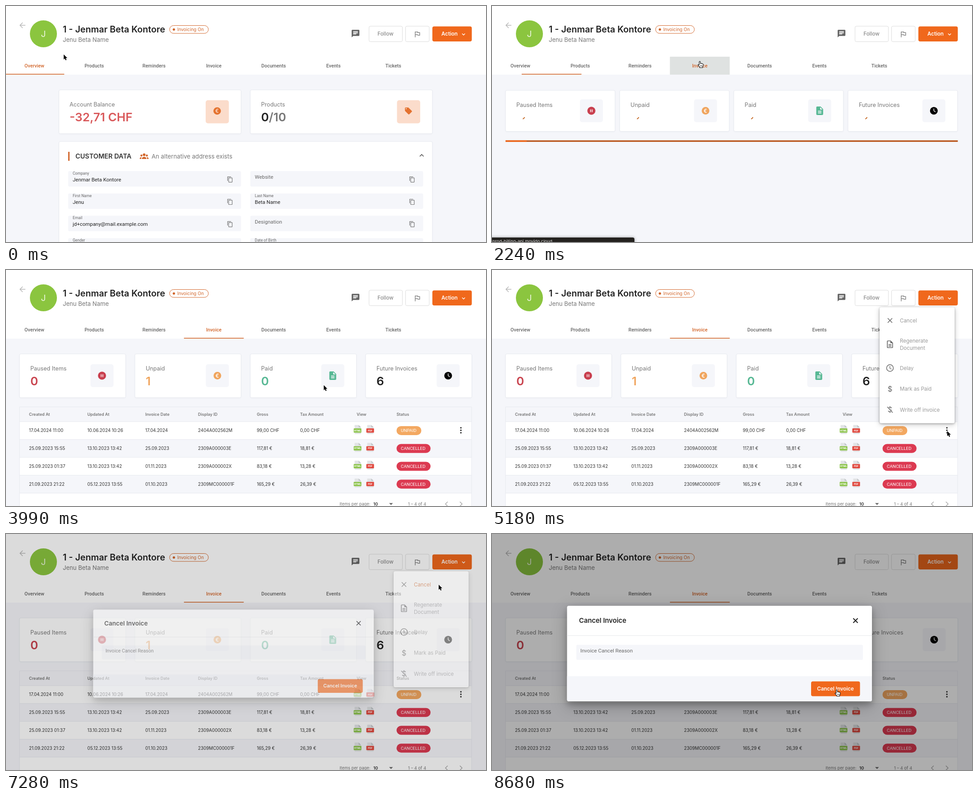
Recreate the animation shown at these times as an HTML page. Size 1065 px wide and 526 px high, loop 9.1 s.

```html
<!DOCTYPE html>
<html lang="en">
<head>
<meta charset="utf-8">
<title>Cancel an invoice</title>
<style>
html, body { margin: 0; width: 100%; height: 100%; overflow: hidden; background: #fff; }
svg { display: block; width: 1065px; height: 526px; font-family: Inter, Roboto, sans-serif; }
.rb { font-family: Roboto, sans-serif; }
.card { filter: drop-shadow(0 1px 1px rgba(30, 40, 80, .04)); }
.menu { filter: drop-shadow(0 1px 2px rgba(0, 0, 0, .3)) drop-shadow(0 3px 6px rgba(0, 0, 0, .2)); }
.dialog { filter: drop-shadow(0 7px 7px rgba(0, 0, 0, .22)) drop-shadow(0 9px 17px rgba(0, 0, 0, .24)); }
.bubble { filter: drop-shadow(0 0 3px rgba(0, 0, 0, .4)); }
</style>
</head>
<body>
<svg id="stage" viewBox="0 0 1065 526"></svg>
<script>
const LOOP = 9100, STEP = 70;
const ORANGE = '#f0681c', RUST = '#d2662b', GREY = '#777', PALE = '#f5f6fa', LINE = '#e7e9ef', INK = '#222';
const ICON = {
  chat: 'M20 2H4c-1.1 0-2 .9-2 2v18l4-4h14c1.1 0 2-.9 2-2V4c0-1.1-.9-2-2-2zM6 9h12v2H6zm8 5H6v-2h8zm4-6H6V6h12z',
  flag: 'M14.4 6 14 4H5v17h2v-7h5.6l.4 2h7V6zm3.6 8h-4l-.4-2H7V6h5l.4 2H18z',
  copy: 'M16 1H4c-1.1 0-2 .9-2 2v14h2V3h12zm3 4H8c-1.1 0-2 .9-2 2v14c0 1.1.9 2 2 2h11c1.1 0 2-.9 2-2V7c0-1.1-.9-2-2-2zm0 16H8V7h11z',
  doc: 'M14 2H6c-1.1 0-2 .9-2 2v16c0 1.1.9 2 2 2h12c1.1 0 2-.9 2-2V8zm2 16H8v-2h8zm0-4H8v-2h8zm-3-5V3.5L18.5 9z',
  docLine: 'M8 16h8v2H8zm0-4h8v2H8zm6-10H6c-1.1 0-2 .9-2 2v16c0 1.1.9 2 2 2h12c1.1 0 2-.9 2-2V8zm4 18H6V4h7v5h5z',
  tag: 'M21.4 11.6l-9-9C12 2.2 11.5 2 11 2H4c-1.1 0-2 .9-2 2v7c0 .5.2 1 .6 1.4l9 9c.8.8 2 .8 2.8 0l7-7c.8-.8.8-2 0-2.8zM5.5 7a1.5 1.5 0 1 1 0-3 1.5 1.5 0 0 1 0 3z'
};

const clamp = (v, a = 0, b = 1) => Math.min(b, Math.max(a, v));
const smooth = p => p * p * (3 - 2 * p);
const span = (t, from, to) => clamp((t - from) / (to - from));

const rect = (x, y, w, h, fill, r = 0, extra = '') =>
  `<rect x="${x}" y="${y}" width="${w}" height="${h}" rx="${r}" fill="${fill}" ${extra}/>`;
const circle = (x, y, r, fill, extra = '') => `<circle cx="${x}" cy="${y}" r="${r}" fill="${fill}" ${extra}/>`;
const text = (x, y, s, size, fill, weight = 400, extra = '') =>
  `<text x="${x}" y="${y}" font-size="${size}" fill="${fill}" font-weight="${weight}" ${extra}>${s}</text>`;
const roboto = (x, y, s, size, fill, weight = 400, extra = '') => text(x, y, s, size, fill, weight, 'class="rb" ' + extra);
const stroke = (d, color, w = 1.5, extra = '') => `<path d="${d}" fill="none" stroke="${color}" stroke-width="${w}" ${extra}/>`;
const icon = (name, x, y, scale, fill) =>
  `<path d="${ICON[name]}" fill="${fill}" transform="translate(${x} ${y}) scale(${scale}) translate(-12 -12)"/>`;
const group = (body, extra = '') => `<g ${extra}>${body}</g>`;
const cross = (x, y, r, color, w) => stroke(`M${x - r} ${y - r}l${2 * r} ${2 * r}m0 ${-2 * r}l${-2 * r} ${2 * r}`, color, w);
const MID = 'text-anchor="middle"';
const panel = (x, y, w, h) => rect(x, y, w, h, '#fff', 3, `stroke="${LINE}" class="card"`);
const euro = (x, y, r, fill, ink) => circle(x, y, r, fill) + text(x - .3, y + 4.2, '€', 11.5, ink, 600, MID);

function header(t, active) {
  const tabs = ['Overview', 'Products', 'Reminders', 'Invoice', 'Documents', 'Events', 'Tickets'];
  const inkX = -3.4 + 398.2 * smooth(span(t, 2110, 2600));
  const focus = t < 2170 ? 0 : 1 - span(t, 2520, 2730);
  return rect(0, 0, 1065, 153, '#fff') +
    stroke('M43 43H31m6-6l-6 6 6 6', '#b9b9b9', 1.5) +
    circle(83, 62, 30, '#8bc53f') + text(83, 69, 'J', 19, '#eef7e2', 400, MID) +
    text(126, 59, '1 - Jenmar Beta Kontore', 19.7, INK, 600) +
    text(126, 80, 'Jenu Beta Name', 13.1, GREY) +
    rect(363, 43.5, 86, 17.5, '#fff', 8.75, `stroke="${RUST}"`) +
    circle(372.5, 52.3, 2.6, RUST) + text(380, 56, 'Invoicing On', 10, RUST) +
    icon('chat', 775.5, 61.5, .86, '#666') +
    rect(805.5, 45, 74, 34.5, '#fff', 3, 'stroke="#dcdcdc"') + text(842, 66.2, 'Follow', 11.5, '#8a8a8a', 500, MID) +
    rect(886.5, 45, 52.5, 34.5, '#fff', 3, 'stroke="#dcdcdc"') + icon('flag', 912.5, 63, .76, '#888') +
    rect(946, 45.5, 87.5, 33.5, ORANGE, 4) + text(966, 66.2, 'Action', 11.5, '#fff', 600) +
    stroke('M1012 61.5l3.2 3.2 3.2-3.2', '#fff', 1.4) +
    rect(394.7, 113, 132.7, 40, '#dfe2e1', 0, `opacity="${focus}"`) +
    tabs.map((s, i) => roboto(63 + 132.7 * i, 136.5, s, 10.67, i === active ? RUST : '#666', 500, MID)).join('') +
    rect(inkX, 151.2, 132.7, 1.6, RUST);
}

function field(x, y, label, value) {
  return rect(x, y, 383.5, 34.5, PALE, 3) + icon('copy', x + 359, y + 18.7, .6, '#777') + (value
    ? roboto(x + 10, y + 7.7, label, 8.6, '#666') + roboto(x + 10, y + 22.8, value, 11.45, INK)
    : roboto(x + 10, y + 17.2, label, 11.45, '#666'));
}

function overview() {
  const people = [[306.5, 331.5, 3], [300.5, 333.2, 2.2], [312.5, 333.2, 2.2]].map(p => circle(...p, RUST)).join('') +
    `<path d="M301.5 341v-2.2q5-5.4 10 0V341zM296.8 341v-2q1.4-2.4 4-2.3-1 2-.8 4.3zM316.2 341v-2q-1.4-2.4-4-2.3 1 2 .8 4.3z" fill="${RUST}"/>`;
  const rows = [
    ['Company', 'Jenmar Beta Kontore', 'Website', ''],
    ['First Name', 'Jenu', 'Last Name', 'Beta Name'],
    ['Email', 'jd+company@mail.example.com', 'Designation', ''],
    ['Gender', ' ', 'Date of Birth', ' ']];
  return panel(117.5, 187, 404, 97.5) + text(141, 223.5, 'Account Balance', 12.6, GREY) +
    text(141, 256.5, '-32,71 CHF', 26.2, '#d9595b', 600) +
    rect(443, 210, 51.5, 51.5, '#fbdccb', 5) + euro(468.5, 234, 8.3, '#e4722f', '#fbdccb') +
    panel(542, 187, 404, 97.5) + text(566, 223.5, 'Products', 12.6, GREY) +
    text(566, 256.5, `0<tspan fill="${GREY}">/10</tspan>`, 26.2, INK, 600) +
    rect(867.5, 210, 51.5, 51.5, '#fbdccb', 5) + icon('tag', 893, 234, .78, '#e4722f') +
    panel(117.5, 302, 828.5, 260) + rect(138, 325, 3, 20, RUST) +
    text(154, 340.3, 'CUSTOMER DATA', 14.5, '#333', 600) + people +
    text(323, 340, 'An alternative address exists', 13.2, GREY) +
    stroke('M918 335.3l4.3-4.3 4.3 4.3', '#555', 1.6) +
    rows.map((r, i) => field(138, 368 + 49.8 * i, r[0], r[1]) + field(542, 368 + 49.8 * i, r[2], r[3])).join('');
}

function spinner(x, y, t) {
  const phase = t - 2240, mid = 45 + phase * 360 / 770;
  const half = (35 + 200 * Math.sin(Math.PI * phase / 700) ** 2) / 2;
  const at = deg => `${x + 9.5 * Math.cos(deg * Math.PI / 180)} ${y + 9.5 * Math.sin(deg * Math.PI / 180)}`;
  return stroke(`M${at(mid - half)}A9.5 9.5 0 ${half > 90 ? 1 : 0} 1 ${at(mid + half)}`, '#c4651f', 2);
}

function summaryCards(t, listed, counted) {
  const pitch = listed ? 256 : 253.3, w = listed ? 235.5 : 243, top = listed ? 187 : 188;
  const cy = counted ? 235.5 : top + 45.5;
  const icons = [
    x => circle(x, cy, 9, '#c9404f') + stroke(`M${x - 1.8} ${cy - 3}v6m3.6-6v6`, '#fff', 1.6),
    x => euro(x, cy, 8.5, '#f0a55e', '#fff'),
    x => icon('doc', x, cy, .95, '#57b894'),
    x => circle(x, cy, 8.6, '#000') + stroke(`M${x} ${cy - 5}v5l3.4 2.6`, '#fff', 1.4)];
  const cards = [['Paused Items', 0, '#c9444f'], ['Unpaid', 1, '#f0a55e'], ['Paid', 0, '#57b894'], ['Future Invoices', 6, INK]];
  return cards.map(([label, count, color], i) => {
    const x = 30 + pitch * i, ix = x + w - 52.5;
    return panel(x, top, w, counted ? 97.5 : 91.5) + text(x + 24, top + 36.5, label, 12.6, GREY) +
      rect(ix - 25.5, cy - 25.5, 51, 51, PALE, 5) + icons[i](ix) +
      (counted ? text(x + 24, 256.5, count, 26.2, color, 600) : spinner(x + 34, top + 55.5, t));
  }).join('');
}

function fileIcon(x, y, label, color) {
  return `<path d="M${x + 2} ${y}h9l5 5v15h-14z" fill="#e2e4e6"/><path d="M${x + 11} ${y}l5 5h-5z" fill="#bfc4c8"/>` +
    rect(x, y + 7.5, 17, 9.5, color, 1) + text(x + 8.5, y + 14.2, label, 5.2, '#fff', 700, MID);
}

function table(dy) {
  const cols = [51, 180.5, 309, 426, 556.5, 652.5, 778, 866.5];
  const heads = ['Created At', 'Updated At', 'Invoice Date', 'Display ID', 'Gross', 'Tax Amount', 'View', 'Status'];
  const rows = [
    ['17.04.2024 11:00', '10.06.2024 10:26', '17.04.2024', '2404A002562M', '99,00 CHF', '0,00 CHF'],
    ['25.09.2023 15:55', '13.10.2023 13:42', '25.09.2023', '2309A000003E', '117,81 €', '18,81 €'],
    ['25.09.2023 01:37', '13.10.2023 13:42', '01.11.2023', '2309A000002X', '83,18 €', '13,28 €'],
    ['21.09.2023 21:22', '05.12.2023 13:55', '01.10.2023', '2309MC000001F', '165,29 €', '26,39 €']];
  const body = rows.map((row, i) => {
    const top = 338 + 39.8 * i, mid = top + 19.9, unpaid = i === 0;
    return rect(30, top, 1003, 39.8, i % 2 ? PALE : '#fff') + rect(30, top - .5, 1003, 1, LINE) +
      row.map((s, c) => text(cols[c], mid + 3.4, s, 9.8, '#333')).join('') +
      fileIcon(771.5, mid - 12.5, 'HTML', '#8bc34a') + fileIcon(799.5, mid - 12.5, 'PDF', '#e0483e') +
      rect(866.5, mid - 10, unpaid ? 55 : 75.5, 20, unpaid ? '#f3a861' : '#dc3a51', 10) +
      roboto(876, mid + 3.5, unpaid ? 'UNPAID' : 'CANCELLED', 9.9, '#fff') +
      (unpaid ? [-5.5, 0, 5.5].map(d => circle(1009.3, mid - .6 + d, 1.7, '#333')).join('') : '');
  }).join('');
  return group(rect(30, 305, 1003, 250, '#fff', 2) + rect(30, 305, 1003, 33, PALE) +
    heads.map((s, c) => text(cols[c], 325, s, 9, GREY, 600)).join('') + body +
    rect(30, 496.7, 1003, 1, LINE) + stroke('M30 540V305H1033V540', LINE, 1) +
    text(740, 524.5, 'Items per page:', 9.25, GREY) + text(815, 524.5, '10', 9.6, '#333', 600) +
    '<path d="M850 519.5h8.5l-4.2 4.3z" fill="#666"/>' + text(892, 524.5, '1 – 4 of 4', 9.4, GREY) +
    stroke('M980 516.5l-5 5 5 5m27-10l5 5-5 5', '#aaa', 1.5), `transform="translate(0 ${dy})"`);
}

function progress(t) {
  const run = (t - 2170) * .67, from = Math.max(0, run - 500);
  return rect(30, 299.5, 1003.5, 3.2, '#b74f12') + rect(30 + from, 299.5, run - from, 3.2, ORANGE);
}

function statusBubble(t) {
  const y = 526 - 20 * smooth(span(t, 2170, 2310)) * (1 - span(t, 2730, 2870));
  return y >= 526 ? '' : rect(-6, y, 322, 30, '#24221f', 4, 'class="bubble"') +
    text(1, y + 11.5, 'prod-billing-api.movido.cloud', 9.5, '#ddd');
}

function menu(t) {
  const open = span(t, 4830, 4970), shown = t < 7280 ? open : t < 7350 ? .5 : t < 7420 ? .05 : 0;
  if (!shown) return '';
  const label = (y, s, color = '#999') => text(905, y, s, 11.5, color);
  const dollar = y => text(883, y + 5.8, '$', 16.5, '#666', 400, MID);
  const scale = .8 + .2 * open;
  return group(rect(860, 83, 166.5, 258.5, '#fff', 4, 'class="menu"') +
    cross(883, 112.5, 5, '#666', 1.5) + label(116.6, 'Cancel', t >= 6020 ? RUST : '#999') +
    icon('docLine', 883, 165.5, .83, '#666') + label(161.5, 'Regenerate') + label(178, 'Document') +
    circle(883, 218.5, 7.5, 'none', 'stroke="#666" stroke-width="1.5"') + stroke('M882.8 214v5l3.6 2.2', '#666', 1.3) + label(222.8, 'Delay') +
    dollar(265) + label(269.2, 'Mark as Paid') +
    dollar(311.5) + stroke('M877 305.5l12 12.5', '#fff', 3) + stroke('M877 305l12 13', '#666', 1.4) + label(315.8, 'Write off invoice'),
    `opacity="${shown}" transform="translate(1026 83) scale(${scale}) translate(-1026 -83)"`);
}

function dialog(t) {
  if (t < 7280) return '';
  const scale = t < 7350 ? .92 : t < 7420 ? .991 : 1, opacity = t < 7350 ? .6 : t < 7420 ? .98 : 1;
  return group(rect(166.5, 160, 676.5, 213, '#fff', 4, 'class="dialog"') +
    text(193, 198.2, 'Cancel Invoice', 14.8, INK, 600) + cross(806.5, 193, 5, '#111', 1.8) +
    rect(166.5, 226, 676.5, 1, '#e6e8ea') +
    rect(187, 247, 636, 33.5, PALE, 3) + roboto(196, 263.8, 'Invoice Cancel Reason', 11.6, '#666') +
    `<path d="M166.5 317h676.5v52q0 4-4 4h-668.5q-4 0-4-4z" fill="${PALE}"/>` +
    rect(708, 328.5, 108.5, 33, ORANGE, 4) + text(762, 349, 'Cancel Invoice', 11.5, '#fff', 600, MID),
    `opacity="${opacity}" transform="translate(504.7 266.5) scale(${scale}) translate(-504.7 -266.5)"`);
}

const PATH = [[700, 128, 108], [1120, 101, 139], [1400, 101, 139], [2030, 461, 123], [2660, 461, 123], [3010, 473, 179],
  [3640, 473, 179], [4410, 1010, 359], [5600, 1010, 359], [6090, 960, 113], [7770, 960, 113], [8680, 765, 347]];

function cursor(t) {
  const next = PATH.findIndex(k => k[0] > t);
  const b = PATH[next < 0 ? PATH.length - 1 : next], a = PATH[next < 0 ? PATH.length - 1 : Math.max(0, next - 1)];
  const p = a === b ? 0 : smooth(span(t, a[0], b[0]));
  const x = a[1] + (b[1] - a[1]) * p, y = a[2] + (b[2] - a[2]) * p;
  const hand = (t > 980 && t < 2870) || (t > 8400 && y > 329);
  const shape = hand
    ? '<path d="M-1.3 1.2Q0-.6 1.3 1.2V5.2Q2.6 4.2 3.6 5.5 5 4.7 5.8 6 7.6 5.6 7.8 7.5 8 10.5 6.4 12.4V14.5H-.2V13Q-2.6 10.6-4 8.2-3.6 6.6-1.3 8.4z" fill="#fff" stroke="#111" stroke-width="1.1" stroke-linejoin="round"/>' + stroke('M1.6 9v3m1.8-3v3m1.8-3v3', '#111', .7)
    : '<path d="M0 0V11.2L2.5 8.9 4.3 13 6.3 12.1 4.6 8.1H8z" fill="#000" stroke="#fff" stroke-width="1" paint-order="stroke"/>';
  return group(shape, `transform="translate(${x} ${y})"`);
}

function scene(t) {
  const invoices = t >= 2170, listed = t >= 2590, counted = t >= 3430;
  const content = !invoices ? overview()
    : summaryCards(t, listed, counted) + (listed ? table(counted ? 0 : -5.8) : progress(t));
  const dim = .32 * (1 - (1 - span(t, 7210, 7490)) ** 2);
  return rect(0, 0, 1065, 526, PALE) + header(t, invoices ? 3 : 0) + content + statusBubble(t) +
    rect(0, 0, 1065, 526, '#000', 0, `opacity="${dim}"`) + menu(t) + dialog(t) + cursor(t);
}

const stage = document.getElementById('stage');
const start = performance.now();
let drawn = -1;
function tick() {
  const t = Math.floor((performance.now() - start) % LOOP / STEP) * STEP;
  if (t !== drawn) stage.innerHTML = scene(drawn = t);
  requestAnimationFrame(tick);
}
tick();
</script>
</body>
</html>
```
